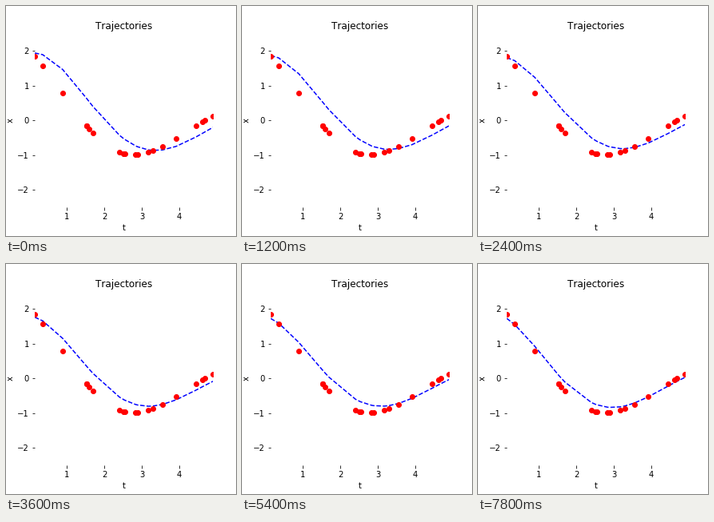
Recreate the animation shown at these times as a matplotlib script. Size 288 by 288 pixels, loop 8000 ms.

```python
import numpy as np
import matplotlib.pyplot as plt
from matplotlib.animation import FuncAnimation

TICK_MS = 200
TICKS = 40
TICKS_PER_STEP = 3

plt.rcParams["text.kerning_factor"] = 6

# Irregular observation times
t_obs = np.array([0.141, 0.354, 0.887, 1.524, 1.524, 1.594, 1.694, 2.404, 2.504, 2.544,
                  2.834, 2.884, 3.174, 3.294, 3.554, 3.914, 4.444, 4.614, 4.684, 4.900])


def damped_wave(amp, decay, freq, phase):
    return amp * np.exp(-decay * t_obs) * np.cos(freq * t_obs + phase)


def predict(seconds):
    """Fitted trajectory: its phase advances while its amplitude settles."""
    amp = 1.785 + 0.0079 * (seconds - 6) ** 2
    phase = -0.374 + 0.05 * seconds
    return damped_wave(amp, 0.25, 0.97, phase)


fig, ax = plt.subplots(figsize=(4, 4), dpi=72, facecolor="white")
fig.subplots_adjust(left=0.125, right=0.9, bottom=0.125, top=0.88)
for spine in ax.spines.values():
    spine.set_visible(False)
ax.set_title("Trajectories")
ax.set_xlabel("t")
ax.set_ylabel("x")
ax.set_xticks(range(1, 5))
ax.set_yticks(range(-2, 3))
ax.set_xlim(t_obs[0], t_obs[-1])
ax.set_ylim(-2.5, 2.5)

curve, = ax.plot(t_obs, predict(0), "b--", lw=1.5)
ax.plot(t_obs, damped_wave(2.035, 0.247, 0.957, 0.226), "ro", ms=6)


def update(tick):
    start = tick - tick % TICKS_PER_STEP
    curve.set_ydata(predict(start * TICK_MS / 1000))
    return curve,


anim = FuncAnimation(fig, update, frames=TICKS, interval=TICK_MS,
                     repeat=True, repeat_delay=0)
plt.show()
```
